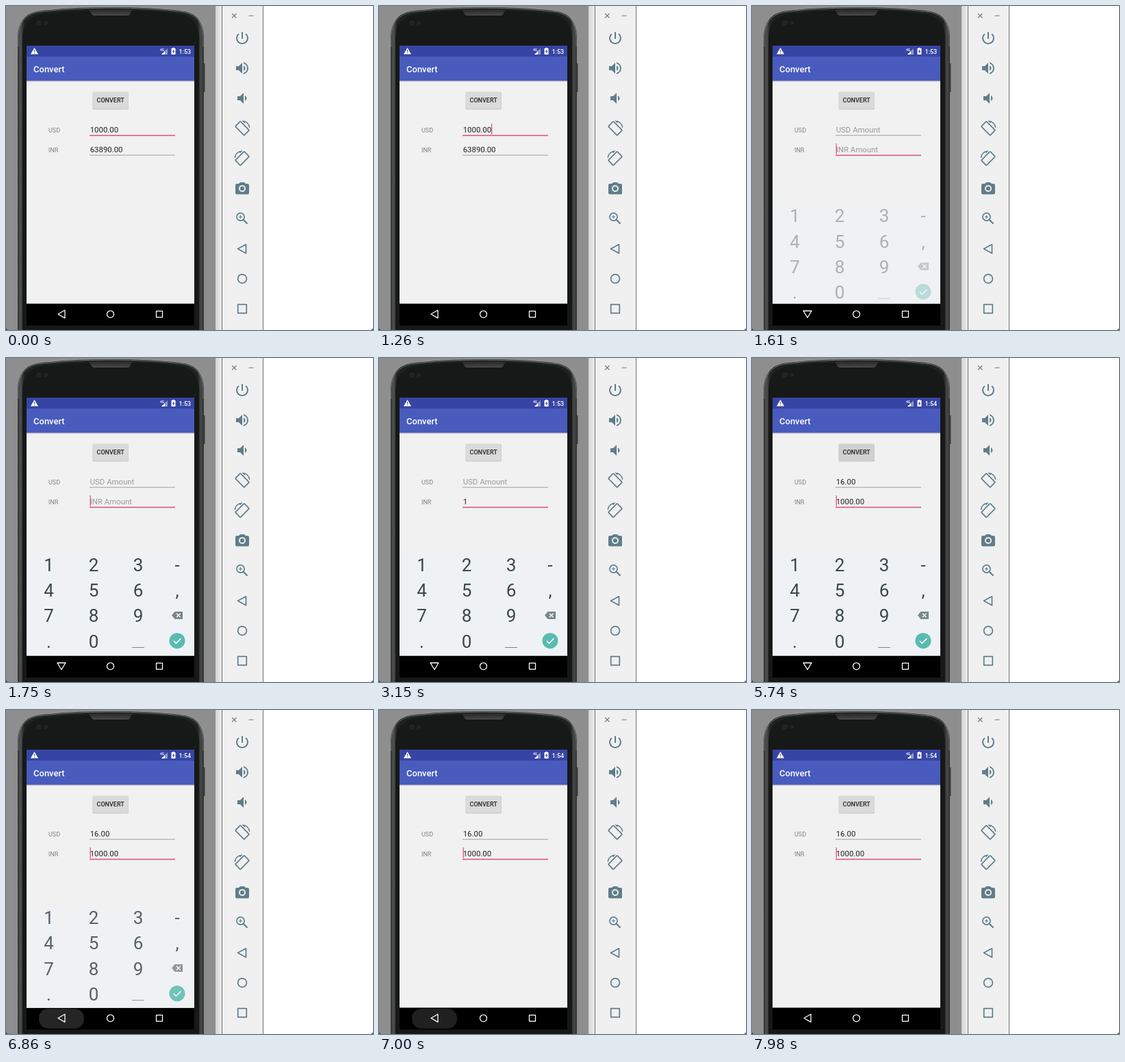
These frames come from a looping animation (536 by 474 pixels, 8000 ms). An HTML page:

```html
<!DOCTYPE html>
<html lang="en">
<head>
<meta charset="utf-8">
<title>Currency converter</title>
<style>
  html, body { margin: 0; width: 100%; height: 100%; overflow: hidden; background: #fff; }
  svg { display: block; width: 536px; height: 474px; font-family: Roboto, sans-serif; }
  .medium { font-weight: 500; }
  .label { font-size: 9px; fill: #808080; }
  .field { font-size: 11.4px; }
  .key { font-size: 26px; fill: #37474f; text-anchor: middle; }
  .nav { fill: none; stroke: #fff; stroke-width: 1.3; stroke-linejoin: round; }
  .tools { fill: #607d8b; }
  .tools .line { fill: none; stroke: #607d8b; stroke-width: 1.7; stroke-linejoin: round; }
</style>
</head>
<body>
<svg viewBox="0 0 536 474">
  <defs>
    <linearGradient id="rim" x2="1" y2="0">
      <stop offset="0" stop-color="#303030"/>
      <stop offset=".015" stop-color="#505252"/>
      <stop offset=".035" stop-color="#202121"/>
      <stop offset=".965" stop-color="#202121"/>
      <stop offset=".985" stop-color="#484a4a"/>
      <stop offset="1" stop-color="#303030"/>
    </linearGradient>
    <linearGradient id="strip" x2="1" y2="0">
      <stop offset="0" stop-color="#d5d5d5"/>
      <stop offset="1" stop-color="#ededed"/>
    </linearGradient>
    <linearGradient id="speaker" x2="0" y2="1">
      <stop offset="0" stop-color="#272727"/>
      <stop offset="1" stop-color="#484848"/>
    </linearGradient>
    <clipPath id="aboveNav"><path d="M30 58H275V436H30Z"/></clipPath>
  </defs>

  <path fill="#fff" d="M0 0H536V474H0Z"/>
  <path fill="#8e8e8e" d="M0 0H307V474H0Z"/>
  <path fill="url(#strip)" d="M306 0H315V474H306Z"/>
  <path fill="#333" d="M0 470Q0 474 4 474H0ZM536 470Q536 474 532 474H536Z"/>

  <!-- phone body -->
  <path fill="#3b3d3d" d="M288 84H290.5V126H288Z"/>
  <path fill="url(#rim)" d="M17 474V45Q18 14 45 8Q90 2 152 2Q215 2 261 8Q288 14 289 45V474Z"/>
  <path fill="none" stroke="#6c6e6e" d="M18 60V45Q19 15 46 9Q90 3 152 3Q215 3 260 9Q287 15 288 45V60"/>
  <path fill="#171818" d="M24 474V46Q25 19 48 13Q90 6 152 6Q215 6 258 13Q281 19 282 46V474Z"/>
  <path fill="url(#speaker)" d="M121 5H185L181 12Q180 14 177 14H129Q126 14 125 12Z"/>
  <g fill="#222424"><circle cx="48" cy="25" r="4"/><circle cx="58" cy="25" r="3"/></g>

  <!-- app -->
  <path fill="#f1f1f1" d="M30 58H275V436H30Z"/>
  <path fill="#d5d6dc" d="M30 109H275V111H30Z"/>
  <path fill="#495bbd" d="M30 74H275V109.5H30Z"/>
  <path fill="#3645a4" d="M30 58H275V74H30Z"/>
  <g fill="#fff">
    <path d="M41.5 61L47 70.5H36Z"/>
    <path d="M227 71L236 62V71Z" opacity=".45"/>
    <path d="M227 71L232 66V71Z"/>
    <text x="225" y="66" font-size="5" class="medium">4G</text>
    <path d="M243 61H246V62H247.5V71H241.5V62H243Z"/>
    <text id="clock" x="252.5" y="69.5" font-size="9" class="medium"></text>
    <text x="40" y="97" font-size="13" class="medium">Convert</text>
  </g>
  <path fill="#3645a4" d="M41 64H42V67.3H41ZM41 68.3H42V69.3H41ZM245 63.5L242.8 67H244.2V69.8L246.4 66H245Z"/>

  <rect x="126.5" y="126.5" width="52.5" height="25" rx="1.5" fill="#c9c9c9"/>
  <rect id="button" x="126.5" y="125.5" width="52" height="24.8" rx="1.5"/>
  <text x="132.5" y="141" font-size="9" class="medium" fill="#202020">CONVERT</text>

  <text class="label" x="62" y="184.5">USD</text>
  <text class="label" x="62" y="213.5">INR</text>
  <text id="usd" class="field" x="122.7" y="185"></text>
  <text id="inr" class="field" x="122.7" y="214"></text>
  <rect id="usdLine" x="122" width="125"/>
  <rect id="inrLine" x="122" width="125"/>
  <rect id="cursor" width="1.2" height="15.5" fill="#e0457d"/>

  <!-- navigation bar -->
  <path fill="#000" d="M30 435.5H275V467.5H30Z"/>
  <rect id="ripple" x="48" y="437" width="66" height="29" rx="14" fill="#252525"/>
  <path id="back" class="nav"/>
  <circle class="nav" cx="152.5" cy="450.8" r="5"/>
  <path class="nav" d="M219.5 446.3H228.5V455.3H219.5Z"/>

  <g clip-path="url(#aboveNav)"><g id="keyboard">
    <path fill="#eff2f4" d="M30 285H275V435.5H30Z"/>
    <g id="keys"></g>
    <path stroke="#78858b" d="M184 423.5H202"/>
    <path fill="#7b878c" d="M242 376.5L246.5 371H258V382H246.5Z"/>
    <path stroke="#fff" stroke-width="1.3" d="M249 373.7L254.6 379.3M254.6 373.7L249 379.3"/>
    <circle cx="250" cy="413.7" r="11.5" fill="#58bbb1"/>
    <path fill="none" stroke="#fff" stroke-width="1.5" d="M244.8 413.8L248.4 417.4L255.4 410.4"/>
  </g></g>

  <!-- emulator toolbar -->
  <path fill="#f0f0f0" d="M315 0H376V474H315Z"/>
  <path stroke="#707070" d="M315.5 0V474M375.5 0V474"/>
  <path stroke="#777" stroke-width="1.1" d="M330 11L336.5 17.5M336.5 11L330 17.5M354.5 14.2H361.5"/>
  <g class="tools">
    <path transform="translate(333 35)" d="M13 3h-2v10h2zM17.83 5.17l-1.42 1.42A7 7 0 1 1 7.58 6.58L6.17 5.17a9 9 0 1 0 11.66 0z"/>
    <g transform="translate(333 79)">
      <path d="M3 9v6h4l5 5V4L7 9zM16.5 12A4.5 4.5 0 0 0 14 7.97v8.05A4.5 4.5 0 0 0 16.5 12zM14 3.23v2.06a7 7 0 0 1 0 13.42v2.06a9 9 0 0 0 0-17.54z"/>
    </g>
    <path transform="translate(333 123)" d="M18.5 12A4.5 4.5 0 0 0 16 7.97v8.05A4.5 4.5 0 0 0 18.5 12zM5 9v6h4l5 5V4L9 9z"/>
    <g id="rotate" transform="translate(345 179)">
      <rect class="line" x="-9.2" y="-5.3" width="18.4" height="10.6" rx="1" transform="rotate(45)"/>
      <path d="M4.3-9.1A10.4 10.4 0 0 1 10-1h1.5A11.5 11.5 0 0 0 0-11.5l-.6 0 3.6 3.7z"/>
    </g>
    <use href="#rotate" transform="translate(690 44) scale(-1 1)"/>
    <path fill-rule="evenodd" d="M342 258H348L350 260H353Q355 260 355 262V273.5Q355 275.5 353 275.5H337Q335 275.5 335 273.5V262Q335 260 337 260H340ZM345 262a5 5 0 1 0 .01 0z"/>
    <circle cx="345" cy="267" r="3.1"/>
    <g class="line">
      <circle cx="342.5" cy="308.5" r="5.6"/>
      <path d="M340 308.5H345M342.5 306V311" stroke-width="1.1"/>
      <path d="M346.7 312.7L352.5 318.5" stroke-width="2.2"/>
      <path d="M338.5 355.3L350.5 348.8V361.8Z"/>
      <circle cx="345" cy="399" r="6.4"/>
      <path d="M338.7 436.7H351.3V449.3H338.7Z"/>
    </g>
  </g>
</svg>
<script>
const LOOP = 8000;
const $ = id => document.getElementById(id);
const set = (id, attrs) => {
  for (const name in attrs) $(id).setAttribute(name, attrs[name]);
};
const clamp = v => Math.min(1, Math.max(0, v));
const ramp = (t, start, length) => clamp((t - start) / length);

const columns = [62.5, 128, 193, 250];
["123-", "456,", "789", ".0"].forEach((row, r) => [...row].forEach((char, c) => {
  const key = document.createElementNS("http://www.w3.org/2000/svg", "text");
  key.setAttribute("class", "key");
  key.setAttribute("x", columns[c]);
  key.setAttribute("y", 312 + r * 37.2);
  key.textContent = char;
  $("keys").append(key);
}));

// Each state restarts the cursor blink; caret is the count of characters before it.
const states = [
  { at: 260, usd: "1000.00", inr: "63890.00", focus: "usd", caret: 7 },
  { at: 1580, usd: "", inr: "", focus: "inr", caret: 0 },
  { at: 2630, usd: "", inr: "1", focus: "inr", caret: 1 },
  { at: 3560, usd: "", inr: "10", focus: "inr", caret: 2 },
  { at: 3700, usd: "", inr: "100", focus: "inr", caret: 3 },
  { at: 4130, usd: "", inr: "1000", focus: "inr", caret: 4 },
  { at: 5610, usd: "16.00", inr: "1000.00", focus: "inr", caret: 0 }
];
const lineY = { usd: 188.7, inr: 217.7 };

function drawField(name, state) {
  const focused = state.focus === name;
  $(name).textContent = state[name] || name.toUpperCase() + " Amount";
  set(name, { fill: state[name] ? "#202020" : "#999" });
  set(name + "Line", {
    y: lineY[name], height: focused ? 1.5 : 1, fill: focused ? "#d94d7c" : "#a0a0a0"
  });
}

function draw(t) {
  const state = states.findLast(s => s.at <= t) || states[0];
  drawField("usd", state);
  drawField("inr", state);
  const caretX = state.caret ? $(state.focus).getSubStringLength(0, state.caret) : 0;
  set("cursor", {
    x: 122.6 + caretX,
    y: lineY[state.focus] - 16.5,
    opacity: t >= state.at && (t - state.at) % 1000 < 500 ? 1 : 0
  });
  $("clock").textContent = t < 4480 ? "1:53" : "1:54";

  const press = ramp(t, 5200, 120) * (1 - ramp(t, 5750, 200));
  const grey = Math.round(218 - 10 * press);
  set("button", { fill: `rgb(${grey},${grey},${grey})` });

  const hidden = t < 4000 ? (1 - ramp(t, 1580, 150)) ** 2 : ramp(t, 6805, 140) ** 2;
  set("keyboard", { opacity: 1 - hidden, transform: `translate(0 ${7 * hidden})` });

  const keyboardOpen = t >= 1580 && t < 6805;
  set("back", { d: keyboardOpen ? "M75 446H87L81 456Z" : "M76 450.8L86 445V456.6Z" });
  set("ripple", { opacity: ramp(t, 6710, 100) * (1 - ramp(t, 6950, 450)) });
}

function tick() {
  draw(performance.now() % LOOP);
  requestAnimationFrame(tick);
}
tick();
</script>
</body>
</html>
```
